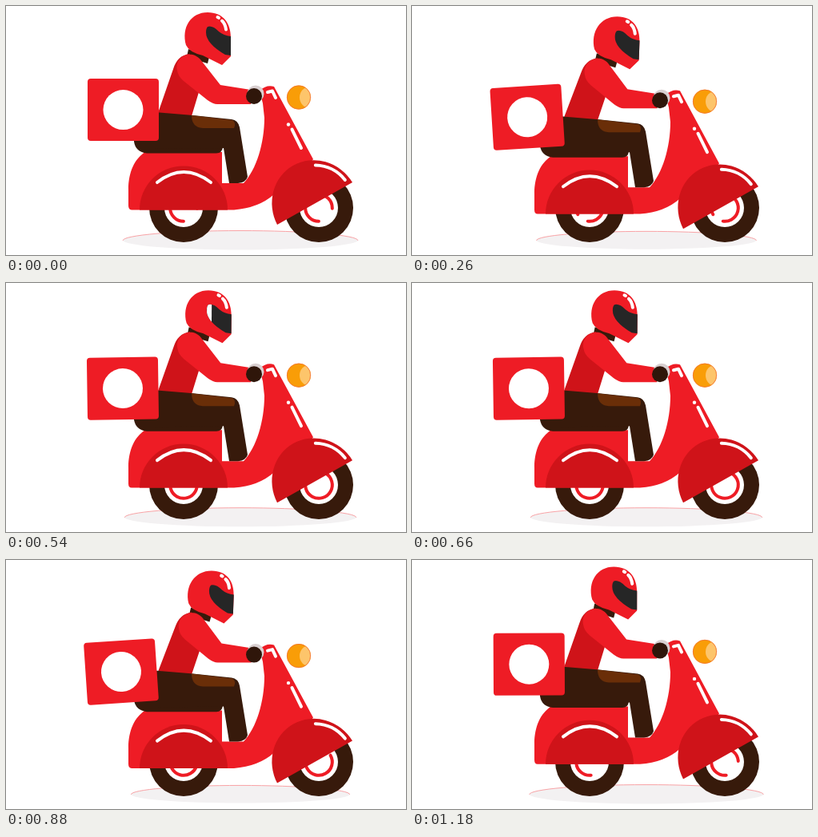
Animation of 500 by 312 pixels, one loop 1.2 s. Source, as an HTML page with a canvas:

```html
<!DOCTYPE html>
<html lang="en">
<head>
<meta charset="utf-8">
<title>Scooter courier</title>
<style>
html, body { margin: 0; width: 100%; height: 100%; overflow: hidden; background: #fff; }
canvas { display: block; }
</style>
</head>
<body>
<canvas id="stage" width="500" height="312"></canvas>
<script>
const ctx = document.getElementById('stage').getContext('2d');
const LOOP = 1200, BOUNCE = 600, TAU = Math.PI * 2;
const RED = '#ee1c25', DARK_RED = '#cf1319', BROWN = '#371a0b', WHITE = '#fff';
const rad = deg => deg * Math.PI / 180;

function fill(d, color) {
  ctx.fillStyle = color;
  ctx.fill(new Path2D(d));
}

function line(d, color = WHITE, width = 4) {
  ctx.strokeStyle = color;
  ctx.lineWidth = width;
  ctx.lineCap = ctx.lineJoin = 'round';
  ctx.stroke(new Path2D(d));
}

function ellipse(x, y, rx, ry, color) {
  ctx.beginPath();
  ctx.ellipse(x, y, rx, ry, 0, 0, TAU);
  ctx.fillStyle = color;
  ctx.fill();
}

const disc = (x, y, r, color) => ellipse(x, y, r, r, color);

function arc(x, y, r, from, to, color, width) {
  ctx.beginPath();
  ctx.arc(x, y, r, rad(from), rad(to));
  ctx.strokeStyle = color;
  ctx.lineWidth = width;
  ctx.lineCap = 'round';
  ctx.stroke();
}

function layer(draw) {
  ctx.save();
  draw();
  ctx.restore();
}

function shadow(p) {
  const rx = 147 - 11 * p, ry = 12 - p;
  ellipse(293, 293.5, rx, ry, '#f3f1f2');
  ctx.beginPath();
  ctx.ellipse(293, 293.5, rx, ry, 0, Math.PI, TAU);
  ctx.strokeStyle = '#f9a3a6';
  ctx.lineWidth = 1;
  ctx.stroke();
}

// The red ring turns once per loop while its gap closes and opens again.
function wheel(x, turn) {
  disc(x, 253, 43, BROWN);
  disc(x, 253, 24, WHITE);
  const middle = 46 + turn * 360;
  const half = 44 * Math.cos(Math.PI * turn) ** 2;
  arc(x, 253, 16.8, middle + half, middle + 360 - half, RED, 4);
}

function scooter() {
  fill('M157 255.4Q153 255.4 153 250V230C153 208 161 191 174 183H270V222H297' +
    'C313 205 323 172 323 140L321 122 317 106Q326 98 335 101L384 192 345 240' +
    'L335 236Q316 253 285 255.4Z', RED);
  fill('M167 255.4A55 55 0 0 1 277 255.4Z', DARK_RED);
  line('M189 221Q222 195 256 221');
  fill('M339 274A54 57 -29.4 0 1 433 221Z', DARK_RED);
  arc(386, 247.5, 48, -89, -38, WHITE, 4);
  line('M357.5 154.5L369 178');
  disc(353, 148.5, 2.2, WHITE);
  line('M327 108L333 106.5 337 115');
}

function headlight() {
  layer(() => {
    disc(366, 114.5, 15, '#f99d07');
    ctx.clip(new Path2D('M351 114.5a15 15 0 0 1 30 0a15 15 0 0 1-30 0Z'));
    ellipse(379, 114.5, 12, 13, '#fdc56b');
  });
  ctx.beginPath();
  ctx.arc(366, 114.5, 14.7, 0, TAU);
  ctx.strokeStyle = '#f26a3a';
  ctx.lineWidth = .7;
  ctx.stroke();
}

function legs() {
  fill('M160 167H271V177Q270 184.6 263 184.6H176Q162 183 160 170Z', BROWN);
  fill('M186 133L234 137 282 142Q290 143 292 152L302 214Q300 221 290 222' +
    'H279L272 178 186 179Z', BROWN);
  fill('M232 137L283 143Q288 146 285 153H246Q232 152 232 137Z', '#6a2e08');
}

function helmet(gleam) {
  fill('M228 54L254 64 252 72 226 64Z', BROWN);
  fill('M225 49C219 27 231 8 252 8C272 8 281 22 281 40V63L270 74 246 62' +
    'Q229 58 225 49Z', RED);
  const visor = 'M252 26Q258 24 266 32Q272 37 281 38V62L274 61Q250 47 250 33Q250 28 252 26Z';
  fill(visor, '#262626');
  if (gleam > 0 && gleam < 1) layer(() => {
    ctx.clip(new Path2D(visor));
    ctx.fillStyle = WHITE;
    ctx.fillRect(281 - 37 * gleam, 20, 6, 50);
  });
  line('M264.5 14L266 14.8');
  line('M270 18.5Q274 22 275 29.5');
}

function upperBody(gleam) {
  helmet(gleam);
  fill('M190 134L209 79Q214 62 229 60L252 84 241 108 232 138Z', DARK_RED);
  fill('M214 81C210 64 231 53 243 67L268 99 306 105V123H264' +
    'Q259 123 252 118L222 94Q215 88 214 81Z', RED);
}

function crate(p) {
  layer(() => {
    ctx.translate(146.5 - 2.7 * p, 130 + 10.7 * p);
    ctx.rotate(rad(-4.1 * p));
    ctx.beginPath();
    ctx.roundRect(-44.5, -39, 89, 78, 4);
    ctx.fillStyle = RED;
    ctx.fill();
    disc(0, 0, 25, WHITE);
  });
}

function draw(t) {
  const p = 1 - Math.abs(1 - 2 * (t % BOUNCE) / BOUNCE);
  const gleam = (t - 350) / 230;
  ctx.fillStyle = WHITE;
  ctx.fillRect(0, 0, 500, 312);
  shadow(p);
  wheel(222, t / LOOP);
  wheel(391, t / LOOP);
  layer(() => {
    ctx.translate(0, 6 * p);
    scooter();
    headlight();
    // The rider leans forward from the hip as the scooter sinks.
    layer(() => {
      ctx.transform(1, 0, -.04 * p, 1, .04 * p * 138, 0);
      upperBody(gleam);
    });
    legs();
    disc(312, 110, 10.5, '#d9d0d1');
    disc(310, 113, 10, '#2f160a');
  });
  crate(p);
}

function tick() {
  draw(performance.now() % LOOP);
  requestAnimationFrame(tick);
}
tick();
</script>
</body>
</html>
```
